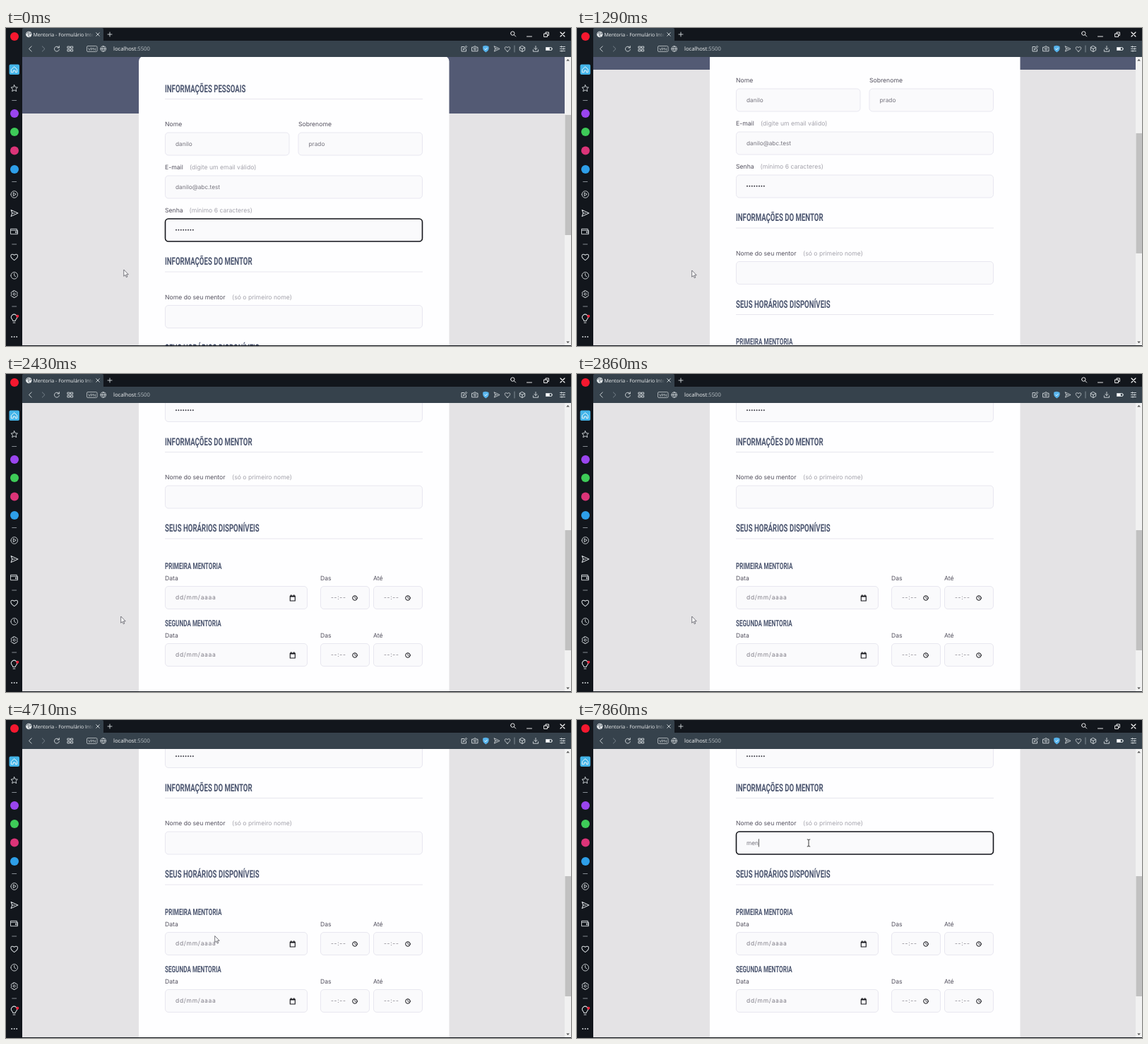
Animation of 800x450 px, one loop 8 s. Source, as an HTML page:

```html
<!DOCTYPE html>
<html lang="pt-BR">
<head>
<meta charset="utf-8">
<title>Mentoria</title>
<style>
  html, body { margin: 0; height: 100%; overflow: hidden; background: #12161c; }
  svg { display: block; width: 100vw; height: 100vh; text-rendering: geometricPrecision; }
  text { font: 8.65px Inter, sans-serif; fill: #53505e; }
  .hint { fill: #a3a2ab; }
  .value { font-size: 8.3px; fill: #77757f; }
  .mask { font-size: 8.5px; fill: #807e88; letter-spacing: .7px; }
  .heading { font: 700 14.8px Roboto, sans-serif; fill: #4c5670; }
  .sub { font-size: 12.5px; }
  .chrome { font: 7px "Open Sans", sans-serif; fill: #f2f4f5; }
  .line { fill: none; stroke-linecap: round; stroke-linejoin: round; }
  .field { fill: #fafafc; stroke: #e8e7f0; }
  .ring { fill: none; stroke: #15161b; stroke-width: 1.6; }
</style>
</head>
<body>
<svg viewBox="0 0 800 450">
  <defs>
    <clipPath id="view"><rect x="23" y="41" width="768" height="408"/></clipPath>
    <linearGradient id="fade">
      <stop stop-color="#36424c" stop-opacity="0"/><stop offset="1" stop-color="#36424c"/>
    </linearGradient>
  </defs>

  <rect width="800" height="450" fill="#12161c"/>
  <rect x="23" y="41" width="768" height="408" fill="#e4e3e5"/>
  <g clip-path="url(#view)"><g id="page"></g></g>

  <rect x="791" y="41" width="9" height="408" fill="#f1f1f1"/>
  <rect id="thumb" x="791.5" width="8.5" height="170" fill="#c1c1c1"/>
  <path d="M793.3 46.5l2.3-2.6 2.3 2.6zM793.3 443.5l2.3 2.6 2.3-2.6z" fill="#505050"/>

  <path d="M23 41V2q0-2 2-2h111q2 0 2 2v16h662v23z" fill="#36424c"/>
  <text class="chrome" x="38.5" y="11.7">Mentoria - Formulário Inte</text>
  <rect x="113" y="2" width="11" height="14" fill="url(#fade)"/>
  <rect x="124" y="2" width="3" height="14" fill="#36424c"/>
  <text class="chrome" x="152" y="32.2" style="font-size:7.7px">localhost<tspan fill="#b9c0c5">:5500</tspan></text>
  <rect x="114.5" y="25.5" width="14.5" height="8" rx="1.5" fill="none" stroke="#c3c9cd" stroke-width=".8"/>
  <text class="chrome" x="116.2" y="31.7" style="font-size:5.7px;fill:#d5dadd">VPN</text>
  <g id="icons" class="line"></g>

  <g id="arrow">
    <path d="M0 0v9.3l2.1-2 1.5 3.4 1.5-.7-1.5-3.2h2.9z" fill="#fff" stroke="#54545c" stroke-width=".8"/>
  </g>
  <g id="beam">
    <path class="line" d="M-1.8-5q1.8 0 1.8.8 0-.8 1.8-.8M0-4.2v8.4M-1.8 5q1.8 0 1.8-.8 0 .8 1.8.8" stroke="#222" stroke-width=".9"/>
  </g>
</svg>
<script>
const $ = id => document.getElementById(id);

// Form, laid out in unscrolled coordinates
const text = (kind, x, y, str) => `<text class="${kind}" x="${x}" y="${y + 3}">${str}</text>`;
const label = (x, y, str) => text('', x, y, str);
const box = (x, y, w, kind = 'field', id = '') =>
  `<rect class="${kind}" id="${id}" x="${x + .5}" y="${y + .5}" width="${w - 1}" height="32" rx="4.5"/>`;
// Condensed capitals
const heading = (y, str, kind = '') =>
  `<text class="heading ${kind}" transform="translate(225 ${y}) scale(.65 1)">${str}</text>`;
const section = (y, str) => heading(y + 5.3, str) + `<path d="M225 ${y + 15}h365" stroke="#e7e6ee"/>`;

const calendar = (x, y) => `<path class="line" stroke="#15151a" stroke-width="1.1"
  d="M${x - 3.5} ${y - 3}h7v7h-7zm0 1h7M${x - 2} ${y - 4.5}v1m4-1v1"/>`;
const clock = (x, y) => `<g class="line" stroke="#15151a"><circle cx="${x}" cy="${y}" r="3.3"/>
  <path d="M${x} ${y - 2}v2l1.4 1" stroke-width=".8"/></g>`;
const timeField = (x, y, name) => label(x, y, name) + box(x, y + 11.5, 70) +
  text('mask', x + 15, y + 27.5, '--:--') + clock(x + 49, y + 28.5);
const schedule = (y, str) => heading(y + 4.5, str, 'sub') +
  label(225, y + 17.5, 'Data') + box(225, y + 29, 202) +
  text('mask', 240, y + 45, 'dd/mm/aaaa') + calendar(405.8, y + 46) +
  timeField(445, y + 17.5, 'Das') + timeField(520, y + 17.5, 'Até');

$('page').innerHTML = `
  <rect x="23" y="-200" width="768" height="321" fill="#535a74"/>
  <rect x="188" y="40" width="439.5" height="800" rx="7" fill="#fefeff"/>` +
  section(85.5, 'INFORMAÇÕES PESSOAIS') +
  label(225, 136, 'Nome') + box(225, 147.5, 176.5) + text('value', 240, 163.5, 'danilo') +
  label(414, 136, 'Sobrenome') + box(413.5, 147.5, 176.5) + text('value', 428.5, 163.5, 'prado') +
  label(225, 197, 'E-mail') + text('hint', 260, 197, '(digite um email válido)') +
  box(225, 208.5, 365) + text('value', 240, 224.5, 'danilo@abc.test') +
  label(225, 258, 'Senha') + text('hint', 259.5, 258, '(mínimo 6 caracteres)') +
  box(225, 269.5, 365) + box(225, 269.5, 365, 'ring', 'passRing') +
  '<path class="line" d="M241 285.8h24" stroke="#3c3b45" stroke-width="2" stroke-dasharray="0 3.4"/>' +
  section(330, 'INFORMAÇÕES DO MENTOR') +
  label(225, 380.5, 'Nome do seu mentor') + text('hint', 320, 380.5, '(só o primeiro nome)') +
  box(225, 392, 365) + box(225, 392, 365, 'ring', 'mentorRing') +
  '<text id="mentor" class="value" x="240" y="411.3"></text>' +
  '<path id="caret" d="M.4 402.8v11.2" stroke="#333" stroke-width=".8"/>' +
  section(452.5, 'SEUS HORÁRIOS DISPONÍVEIS') +
  schedule(505.5, 'PRIMEIRA MENTORIA') + schedule(586.5, 'SEGUNDA MENTORIA');

// Browser icons, each drawn around its own centre
const ring = r => `M${-r} 0a${r} ${r} 0 1 0 ${2 * r} 0a${r} ${r} 0 1 0 ${-2 * r} 0`;
const globe = ring(3.8) + 'M-3.8 0h7.6M0-3.8q-3.4 3.8 0 7.6q3.4-3.8 0-7.6';
const plane = 'M-4-4L4.5 0-4 4l1.4-4zM-2.6 0h3';
const heart = 'M0 3.8C-7-.8-4-5.6 0-2.4 4-5.6 7-.8 0 3.8z';
const cross = 'M-2.3-2.3l4.6 4.6m0-4.6l-4.6 4.6';
const dash = 'M-3 0h6';
const icon = (d, x, y, { stroke = '#d9dee1', fill = 'none', size = 1, weight = .9 } = {}) =>
  `<path transform="translate(${x} ${y}) scale(${size})" d="${d}" stroke="${stroke}" fill="${fill}" stroke-width="${weight}"/>`;
const badge = (y, fill) => `<circle cx="12" cy="${y}" r="6" fill="${fill}"/>`;
const white = { stroke: '#fff' }, big = { size: 1.15 };

$('icons').innerHTML = [
  // Title bar
  icon(ring(3.8), 32.3, 9, { fill: '#eef1f3' }),
  icon('M-3-1l2-2 1 2-1 2 2 2M1-3l2 2-2 1', 32.3, 9, { stroke: '#46525b' }),
  icon(cross, 130, 9), icon('M-3 0h6M0-3v6', 147, 9),
  icon(ring(2.7) + 'M2 2l2.4 2.4', 717.3, 7.6, white), icon('M-3.5 2h7', 741, 10, white),
  icon('M-3-1h4.5v4.5h-4.5zM-1-1v-2h4.5v4.5h-2', 765, 9, white), icon(cross, 788, 9, { ...white, size: 1.3 }),
  // Toolbar
  icon('M1.7-3.6L-2 0l3.7 3.6', 34.5, 29.5), icon('M-1.7-3.6L2 0l-3.7 3.6', 53, 29.5, { stroke: '#7e8991' }),
  icon('M3-1.7A3.5 3.5 0 1 0 3.4 1M3.3-4v2.5h-2.5', 72, 29.5),
  icon('M-3.7-3.4h2.9v2.5h-2.9zM.8-3.4h2.9v2.5h-2.9zM-3.7.9h2.9v2.5h-2.9zM.8.9h2.9v2.5h-2.9z', 91, 29.5),
  icon(globe, 137.8, 29.5, { weight: .75 }),
  icon('M0-3h-3.5v6.5h6.5v-3M-1 1l.4-1.6 3.6-3.6 1.2 1.2-3.6 3.6z', 648.5, 29.5),
  icon('M-4-2.3h2l1-1.3h2l1 1.3h2v5.6h-8z' + ring(1.5), 664, 29.5),
  icon('M0-4.2l3.7 1v3.4q-.5 2.8-3.7 4.2-3.2-1.4-3.7-4.2v-3.4z', 679.4, 29.5, { stroke: '#58b5ee', fill: '#58b5ee' }),
  icon('M-1.5 0l1.2 1.3 2-2.4', 679.4, 29.5, white),
  icon(plane, 695, 29.5, { size: .9 }), icon(heart, 710, 29.8, { size: .9 }),
  icon('M0-4.5v9', 720, 29.5, { stroke: '#8b959c' }),
  icon('M0-4l3.7 2v4l-3.7 2-3.7-2v-4zM-3.7-2l3.7 2 3.7-2M0 0v4', 731, 29.5),
  icon('M0-4v5m-2-2l2 2 2-2M-3.6 1.3v2.4h7.2v-2.4', 750, 29.5),
  icon('M-4-2h7.4v4h-7.4zM4.5-.6v1.2', 769, 29.5), icon('M-4-2h4.5v4h-4.5z', 769, 29.5, { fill: '#fff' }),
  icon('M-3.5-3h7M-3.5 0h7M-3.5 3h7M-1.5-3.8v1.6M1.5-.8v1.6M-1 2.2v1.6', 788, 29.5),
  // Sidebar
  badge(12, '#f5182f'),
  '<rect x="4.5" y="51.5" width="14.5" height="14.5" rx="2" fill="#43b4e8"/>',
  icon('M-4-.4l4-3.6 4 3.6v4.2h-2.5v-2.6h-3v2.6h-2.5z', 11.7, 58.9, white),
  icon('M0-4.6l1.4 3 3.3.4-2.4 2.2.7 3.3-3-1.7-3 1.7.7-3.3-2.4-2.2 3.3-.4z', 11.7, 85.3),
  badge(121, '#9a45ee'), badge(147, '#3ecb58'), badge(173.5, '#dc3478'), badge(200, '#2e9fe8'),
  ...[102.5, 217.5, 306, 394].map(y => icon(dash, 11.7, y, { stroke: '#9299a0' })),
  icon(ring(4.8) + 'M-1.4-2.2v4.4l3.6-2.2z', 11.7, 235.5), icon(plane, 11.7, 262, big),
  icon('M-4.8-3.7h8.4v2h1.2v5.4h-9.6zM-4.8-1.7h8.4M4.8 0h-3v1.8h3', 11.7, 288),
  icon(heart, 11.7, 324.2, big), icon(ring(4.8) + 'M0-3v3l2 1.4', 11.7, 350.3),
  icon('M-1.2-4.8h2.4l.5 1.4 1.4-.3 1.5 2-.8 1.7.8 1.7-1.5 2-1.4-.3-.5 1.4h-2.4l-.5-1.4-1.4.3-1.5-2 .8-1.7-.8-1.7 1.5-2 1.4.3z' + ring(1.5), 11.7, 376.6),
  icon('M-1.5 2.2q0-1.2-1.2-2.3a3.5 3.5 0 1 1 5.4 0q-1.2 1.1-1.2 2.3zM-1.2 4.4h2.4', 11.5, 412, big),
  '<circle cx="16.3" cy="407.8" r="2" fill="#f0253c"/>',
  icon('M-3.5 0h0M0 0h0M3.5 0h0', 11.7, 437, { weight: 1.9 })
].join('');

// Motion, on a clock of seven ticks per second
const LOOP = 8000, TICKS_PER_MS = 7 / 1000;
const smooth = u => u * u * (3 - 2 * u);

// keys: [tick, ...values] in ascending order
function track(keys, tick, ease = u => u) {
  const next = keys.findIndex(key => key[0] > tick);
  if (next < 0) return keys.at(-1).slice(1);
  const [from, to] = [keys[next - 1], keys[next]];
  const u = ease((tick - from[0]) / (to[0] - from[0]));
  return from.slice(1).map((v, i) => v + (to[i + 1] - v) * u);
}

const scrollKeys = [[0, 0], [8, 0], [9, 62], [10, 149.5], [11, 206], [12, 234.5]];
const pointerKeys = [
  [0, 166.8, 342], [3, 162.7, 343], [27, 162.7, 343],
  [33, 295.7, 305.5], [39, 295.7, 305.5], [43, 328, 174]
];
const BLUR = 3, FOCUS = 47, CARET_OFF = 51, TYPING = 53;

const show = (id, on) => $(id).setAttribute('visibility', on ? 'visible' : 'hidden');
const move = (id, x, y) => $(id).setAttribute('transform', `translate(${x} ${y})`);

function render(ms) {
  const tick = Math.floor((ms % LOOP + 5) * TICKS_PER_MS) % 56;
  const [scroll] = track(scrollKeys, tick);
  const [x, y] = track(pointerKeys, tick, smooth);
  const overField = y > 158 && y < 190;

  move('page', 0, -scroll);
  $('thumb').setAttribute('y', 123 + scroll * .418);
  move('arrow', x, y);
  move('beam', x, y);
  show('arrow', !overField);
  show('beam', overField);

  show('passRing', tick < BLUR);
  show('mentorRing', tick >= FOCUS);
  $('mentor').textContent = 'men'.slice(0, Math.max(0, tick - TYPING + 1));
  show('caret', tick >= TYPING || tick >= FOCUS && tick < CARET_OFF);
  move('caret', 240 + $('mentor').getComputedTextLength(), 0);
}

function loop() {
  render(performance.now());
  requestAnimationFrame(loop);
}
loop();
</script>
</body>
</html>
```
